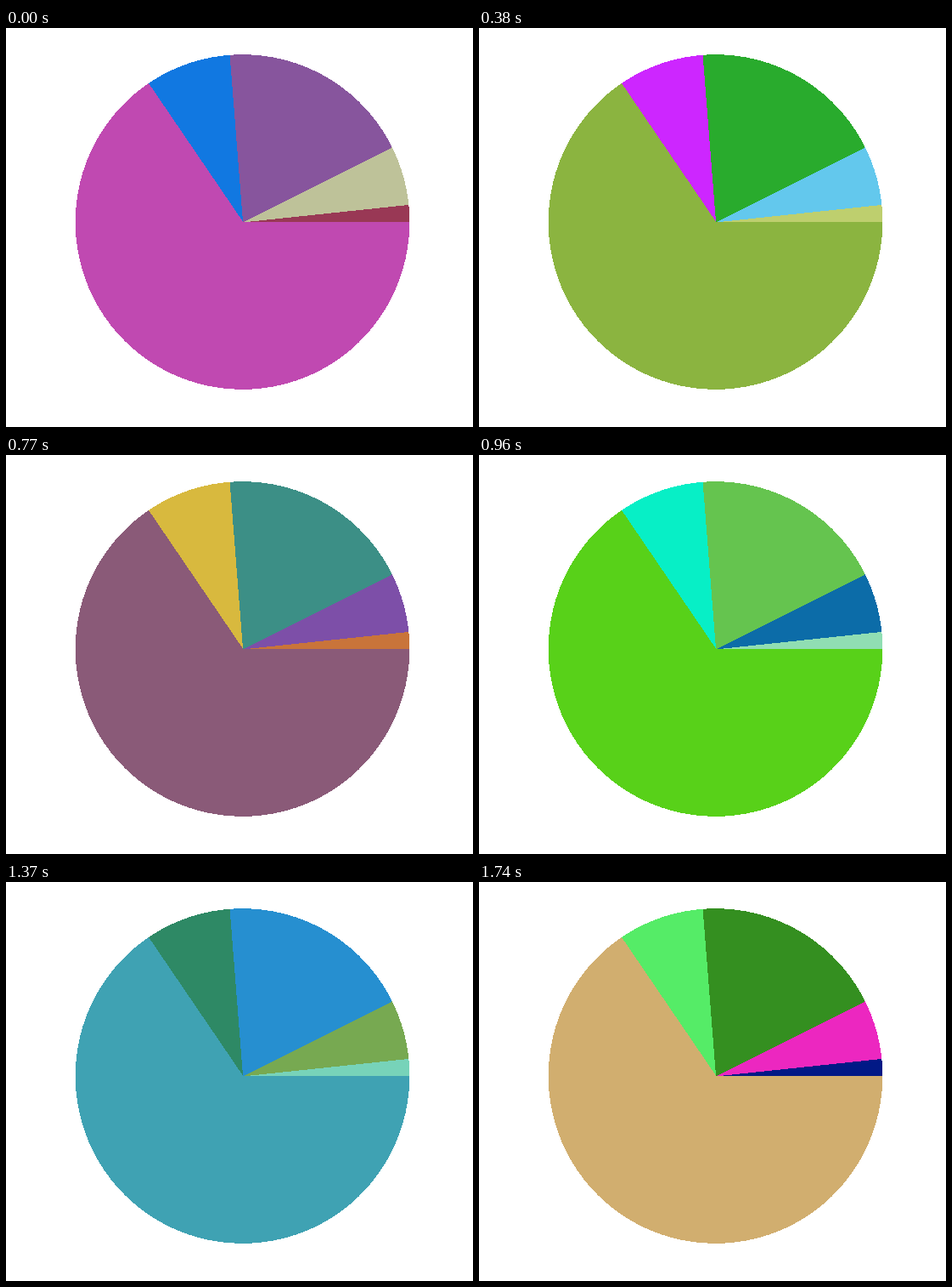
Recreate the animation shown at these times as a matplotlib script. Size 550 by 469 pixels, loop 1940 ms.

```python
import matplotlib.pyplot as plt
from matplotlib.animation import FuncAnimation
from matplotlib.patches import Wedge

WIDTH, HEIGHT, DPI = 550, 469, 100
STEP, LOOP = 10, 1940  # ms
CENTER, RADIUS = (278.5, 228), 196.3
EDGES = [0, 6, 26.6, 94.5, 124.3, 360]  # degrees, counter-clockwise

# Start time in ms, slice colours counter-clockwise from the right
PALETTES = [
    (0, "#993855 #bec299 #87559d #1178e1 #c049b1"),
    (180, "#5a9c7c #d08a4e #4a7fb5 #b5533c #6f8fc4"),
    (380, "#becf6e #63c8ed #29ab2d #cd26ff #8bb440"),
    (580, "#2540cf #423f31 #166516 #6b00b7 #342417"),
    (770, "#c9743a #7d4fa8 #3c8f86 #d8b93e #8a5a78"),
    (960, "#90deb3 #0c6ca8 #65c44f #07efc6 #58d119"),
    (1150, "#9fb834 #ddca95 #32a854 #9195cc #c61418"),
    (1370, "#77d3b9 #77a951 #268fd0 #2e8965 #3fa2b3"),
    (1550, "#4b6ad0 #b8479a #7fa03c #c98f5a #8f78b8"),
    (1740, "#011986 #ec27c0 #348f20 #55ec67 #d1ae6f"),
]

fig = plt.figure(figsize=(WIDTH / DPI, HEIGHT / DPI), dpi=DPI, facecolor="white")
ax = fig.add_axes([0, 0, 1, 1])
ax.set(xlim=(0, WIDTH), ylim=(0, HEIGHT))
ax.axis("off")

cx, cy = CENTER[0], HEIGHT - CENTER[1]
slices = [
    ax.add_patch(Wedge((cx, cy), RADIUS, a, b, linewidth=0, antialiased=False))
    for a, b in zip(EDGES, EDGES[1:])
]


def draw(frame):
    now = frame * STEP
    palette = [colors for start, colors in PALETTES if start <= now][-1]
    for wedge, color in zip(slices, palette.split()):
        wedge.set_facecolor(color)
    return slices


anim = FuncAnimation(fig, draw, frames=LOOP // STEP, interval=STEP,
                     init_func=lambda: draw(0), repeat=True, repeat_delay=0)
plt.show()
```
